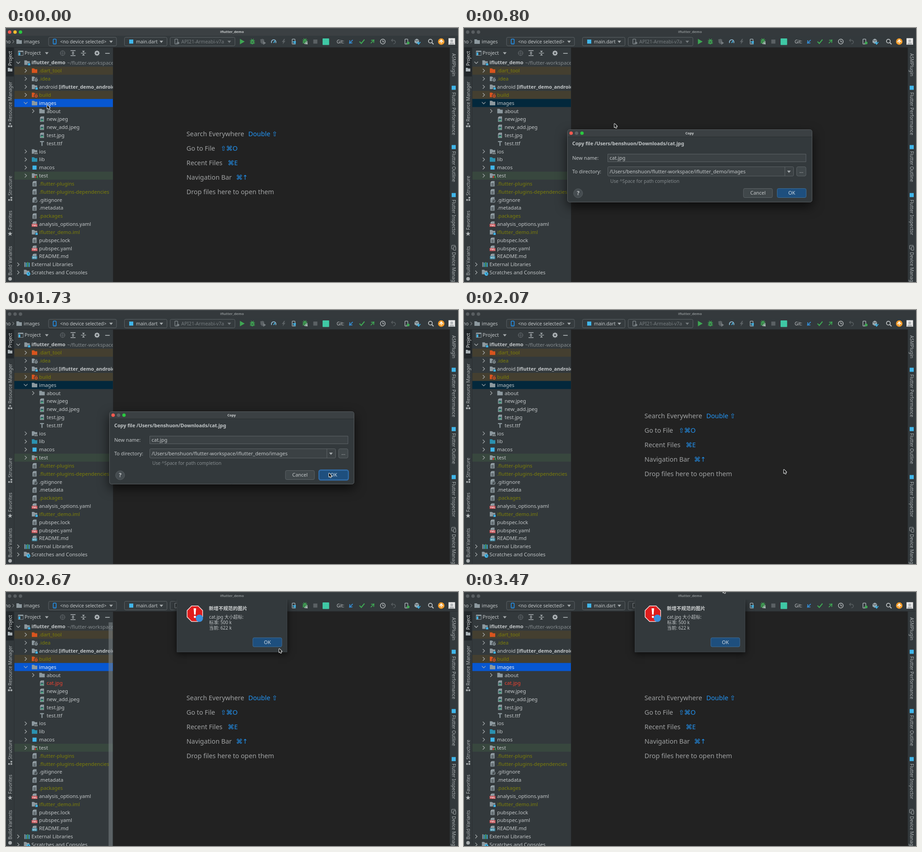
Write an HTML page with a canvas that moves like this. It is 998 px wide and 561 px high and loops after 3.54 s.

```html
<!DOCTYPE html>
<html lang="en">
<head>
<meta charset="utf-8">
<title>iflutter_demo</title>
<style>
html, body { margin: 0; width: 100%; height: 100%; overflow: hidden; background: #222; }
canvas { display: block; }
</style>
</head>
<body>
<canvas id="stage" width="998" height="561"></canvas>
<script>
const ctx = document.getElementById("stage").getContext("2d");
const LOOP = 3540, STEP = 1000 / 15;
const FONT = '"Noto Sans", "Open Sans", "DejaVu Sans", "Noto Sans CJK SC", "Noto Sans CJK", sans-serif';
const C = {
  panel: "#33393c", editor: "#222222", edge: "#26292b", text: "#c3c7c9", soft: "#a6abad",
  olive: "#7d7f08", grey: "#8d999f", dim: "#5b6164", blue: "#2295f5", sky: "#40b6ea",
  green: "#3fa653", orange: "#d9541e", red: "#ef4130", field: "#3b4144", border: "#5d6366"
};

// Drawing helpers
function text(s, x, cy, size = 11.2, color = C.text, weight = 400, align = "left") {
  ctx.font = `${weight} ${size}px ${FONT}`;
  ctx.fillStyle = color;
  ctx.textAlign = align;
  ctx.fillText(s, x, cy + size * 0.36);
}
function box(x, y, w, h, color) {
  ctx.fillStyle = color;
  ctx.fillRect(x, y, w, h);
}
function panel(x, y, w, h, r, fill, stroke, width = 1) {
  ctx.beginPath();
  ctx.roundRect(x, y, w, h, r);
  if (fill) { ctx.fillStyle = fill; ctx.fill(); }
  if (stroke) { ctx.strokeStyle = stroke; ctx.lineWidth = width; ctx.stroke(); }
}
function disc(x, y, r, color) {
  ctx.beginPath();
  ctx.arc(x, y, r, 0, 7);
  ctx.fillStyle = color;
  ctx.fill();
}
function ring(x, y, r, color, width = 1.3, from = 0, to = Math.PI * 2) {
  ctx.beginPath();
  ctx.arc(x, y, r, from, to);
  ctx.strokeStyle = color;
  ctx.lineWidth = width;
  ctx.stroke();
}
function trace(x, y, pts) {
  ctx.beginPath();
  for (let i = 0; i < pts.length; i += 2) ctx.lineTo(x + pts[i], y + pts[i + 1]);
}
function line(x, y, pts, color, width = 1.4) {
  trace(x, y, pts);
  ctx.strokeStyle = color;
  ctx.lineWidth = width;
  ctx.stroke();
}
function poly(x, y, pts, color) {
  trace(x, y, pts);
  ctx.closePath();
  ctx.fillStyle = color;
  ctx.fill();
}
function shadowed(blur, dy, draw) {
  ctx.save();
  ctx.shadowColor = "rgba(0,0,0,.65)";
  ctx.shadowBlur = blur;
  ctx.shadowOffsetY = dy;
  draw();
  ctx.restore();
}
const caret = (x, y, color = C.soft) => poly(x, y, [-4, -2, 4, -2, 0, 3], color);

// Icons, all centred on x, y
function folder(x, y, color = C.grey) {
  poly(x, y, [-6, -5, -1, -5, 1, -3, 6, -3, 6, 5, -6, 5], color);
}
function sheetIcon(x, y) {
  poly(x, y, [-1, -6, 4.5, -6, 4.5, 6, -4.5, 6, -4.5, -2.5], C.grey);
  poly(x, y, [-4.5, -3.2, -1.7, -6, -1.7, -3.2], "#b3bcc0");
}
function gear(x, y, r, color) {
  for (let i = 0; i < 4; i++) {
    const dx = Math.cos(i * Math.PI / 4) * r, dy = Math.sin(i * Math.PI / 4) * r;
    line(x, y, [-dx, -dy, dx, dy], color, r * 0.42);
  }
  disc(x, y, r * 0.74, color);
  disc(x, y, r * 0.34, C.panel);
}
function phone(x, y, color) {
  panel(x - 3.2, y - 5.5, 6.4, 11, 1.2, null, color, 1.5);
  box(x - 1, y + 3, 2, 1, color);
}
function bug(x, y, color) {
  for (const dy of [-2.5, 1, 4]) line(x, y, [-5.5, dy, 5.5, dy], color, 1.2);
  line(x, y, [-3, -6, 0, -3, 3, -6], color, 1.2);
  ctx.beginPath();
  ctx.ellipse(x, y + 1, 3.8, 5, 0, 0, 7);
  ctx.fillStyle = color;
  ctx.fill();
  line(x, y, [-2, 0, 2, 0], C.panel, 1);
  line(x, y, [-2, 2.5, 2, 2.5], C.panel, 1);
}
function arrow(x, y, angle, color, len = 5) {
  ctx.save();
  ctx.translate(x, y);
  ctx.rotate(angle);
  line(0, 0, [-len, 0, len, 0], color, 1.7);
  line(0, 0, [len - 5, -4, len, 0, len - 5, 4], color, 1.7);
  ctx.restore();
}

const icons = {
  folder,
  root(x, y) { folder(x, y); box(x + 1, y + 1, 6, 5, C.panel); box(x + 2, y + 1.5, 5, 4.5, C.sky); },
  hot(x, y) { folder(x, y, C.orange); },
  gear(x, y) { folder(x, y); disc(x + 3, y + 2, 4.5, C.panel); gear(x + 3.5, y + 2.5, 3.8, C.grey); },
  hotGear(x, y) { folder(x, y, C.orange); disc(x + 3, y + 2, 4.5, C.panel); gear(x + 3.5, y + 2.5, 3.8, C.orange); },
  ios(x, y) { folder(x, y); box(x - 1, y + 2, 8, 4, C.panel); for (const d of [0, 2.5, 5]) box(x + d, y + 3, 1.6, 3, "#a8b1b5"); },
  lib(x, y) { folder(x, y, "#2b91b0"); },
  square(x, y) { box(x - 4.5, y - 4.5, 9, 9, C.sky); },
  test(x, y) { folder(x, y); box(x, y, 7, 6, "#35423a"); poly(x, y, [1, 0, 4, 3, 1, 6], C.red); poly(x, y, [7, 0, 4, 3, 7, 6], C.green); },
  file(x, y) { sheetIcon(x, y); for (const d of [-1, 1.2, 3.4]) box(x - 2.5, y + d, 5, 1, C.panel); },
  image(x, y) { sheetIcon(x, y); box(x - 3, y - 1, 6, 5.5, "#2f5961"); poly(x, y, [-3, 4, -.5, 1, 1, 2.5, 2, 1, 3, 4], "#5fc08b"); },
  ttf(x, y) { box(x - 4.5, y - 5, 9, 2.2, C.grey); box(x - 1.2, y - 5, 2.4, 10.5, C.grey); },
  ignore(x, y) { sheetIcon(x, y); disc(x + 2.5, y + 2.5, 4.3, C.panel); ring(x + 2.5, y + 2.5, 3.2, C.grey, 1.2); line(x + 2.5, y + 2.5, [-2.2, -2.2, 2.2, 2.2], C.grey, 1); },
  yaml(x, y) { sheetIcon(x, y); box(x - 6.5, y - .5, 13, 6.5, "#c64b50"); text("YML", x, y + 2.7, 5.5, "#f3dfdf", 700, "center"); },
  md(x, y) { sheetIcon(x, y); box(x - 6, y - .5, 12, 6.5, "#327f9b"); text("MD", x, y + 2.7, 5.5, "#d5edf5", 700, "center"); },
  books(x, y) { ["#8d999f", "#40a5cf", "#48a96a", "#40a5cf"].forEach((c, i) => box(x - 6 + i * 3.2, y - 5 + i % 2, 2.2, 10.5 - i % 2, c)); },
  scratch(x, y) { folder(x - 1, y - 1); disc(x + 3, y + 3, 4.2, C.sky); line(x + 3, y + 3, [0, -2.5, 0, 0, 2, 1], "#20323a", 1); }
};

// label, icon, depth, open state (0 none, 1 closed, 2 open), text colour, row colour
const TREE = [
  ["iflutter_demo", "root", 0, 2],
  [".dart_tool", "hot", 1, 1, C.olive, "#443f30"],
  [".idea", "gear", 1, 1, C.olive],
  ["android", "root", 1, 1],
  ["build", "hotGear", 1, 1, C.olive, "#443f30"],
  ["images", "folder", 1, 2],
  ["about", "folder", 2, 1],
  ["cat.jpg", "image", 2, 0, C.red],
  ["new.jpeg", "image", 2, 0],
  ["new_add.jpeg", "image", 2, 0],
  ["test.jpg", "image", 2, 0],
  ["test.ttf", "ttf", 2, 0],
  ["ios", "ios", 1, 1],
  ["lib", "lib", 1, 1],
  ["macos", "square", 1, 1],
  ["test", "test", 1, 1, C.text, "#38473e"],
  [".flutter-plugins", "file", 1, 0, C.olive],
  [".flutter-plugins-dependencies", "file", 1, 0, C.olive],
  [".gitignore", "ignore", 1, 0],
  [".metadata", "file", 1, 0],
  [".packages", "file", 1, 0, C.olive],
  ["analysis_options.yaml", "yaml", 1, 0],
  ["iflutter_demo.iml", "root", 1, 0, C.olive],
  ["pubspec.lock", "file", 1, 0],
  ["pubspec.yaml", "yaml", 1, 0],
  ["README.md", "md", 1, 0],
  ["External Libraries", "books", 0, 1],
  ["Scratches and Consoles", "scratch", 0, 1]
];

function drawTree(hasCat, focused) {
  ctx.save();
  ctx.beginPath();
  ctx.rect(18, 44, 218, 517);
  ctx.clip();
  const rows = TREE.filter(r => hasCat || r[0] !== "cat.jpg");
  rows.forEach(([label, icon, depth, open, color = C.text, fill], i) => {
    const y = 76.5 + i * 17.83, x = 27 + depth * 16.5;
    const selected = label === "images";
    if (selected) fill = focused ? "#0757d2" : "#03283c";
    if (fill) box(18, y - 8.9, 218, 17.8, fill);
    if (open === 1) line(x, y, [-2, -4, 2, 0, -2, 4], C.soft, 1.3);
    if (open === 2) line(x, y, [-4, -2, 0, 2, 4, -2], C.soft, 1.3);
    icons[icon](x + 19.5, y);
    const tx = 56.3 + depth * 16.7;
    const bold = label === "iflutter_demo";
    text(label, tx, y, bold ? 11 : 11.2, selected && focused ? "#f0f3f6" : color, bold ? 700 : 400);
    if (bold) text("~/flutter-workspace", 135, y, 11.2, "#858b8e");
    if (label === "android") text("[iflutter_demo_android]", 116.5, y, 10.9, C.text, 700);
  });
  ctx.restore();
}

function drawProjectHeader() {
  panel(27, 50.5, 11, 10, 0, null, C.grey);
  box(27, 50, 11, 3, C.grey);
  box(28, 54, 3.5, 6, C.sky);
  text("Project", 41, 55.5, 11);
  caret(90, 55.5);
  ring(125, 55.5, 5, C.dim);
  line(125, 55.5, [-6, 0, 6, 0], C.dim, 1);
  line(125, 55.5, [0, -6, 0, 6], C.dim, 1);
  for (const [x, s] of [[148, 1], [171, -1]]) {
    if (s > 0) for (const d of [-5.5, 5.5]) line(x, 55.5 + d, [-5.5, 0, 5.5, 0], "#b3b9bc", 1.5);
    else line(x, 55.5, [-5.5, 0, 5.5, 0], "#b3b9bc", 1.3);
    const a = s > 0 ? 3.6 : 1.6, b = s > 0 ? 0.8 : 5;
    for (const d of [-1, 1]) poly(x, 55.5, [0, d * a, -3, d * b, 3, d * b], "#b3b9bc");
  }
  gear(201, 55.5, 5.8, "#b3b9bc");
  line(224, 56, [-5, 0, 5, 0], "#b3b9bc", 1.6);
}

function lights(x, y, colors) {
  colors.forEach((c, i) => disc(x + i * 12, y, 3.8, c));
}

function drawToolbar(active) {
  box(0, 0, 998, 43, C.panel);
  box(0, 0, 998, 17, active ? "#3b4043" : "#34393c");
  box(0, 0, 998, 1, active ? "#565b5e" : "#45494c");
  box(0, 42.5, 998, 1, C.edge);
  const off = "#595e61";
  lights(8, 9, active ? ["#ff5a50", "#f8bd2e", "#2bc840"] : [off, off, off]);
  text("iflutter_demo", 499, 8.7, 7.7, active ? "#c9cccd" : "#8a8f91", 600, "center");

  text("no", -2.5, 30, 10.4);
  line(16, 30, [-1.5, -3.5, 1.5, 0, -1.5, 3.5], C.soft, 1);
  folder(29, 30);
  text("images", 39, 30, 10.4);
  for (const [x, w] of [[94, 150], [261.5, 94], [362.5, 143]]) panel(x, 20.5, w, 19, 3, "#353b3e", C.border);
  phone(107.5, 30, C.blue);
  text("<no device selected>", 119.5, 30, 10.5);
  caret(232, 30);
  box(272, 25.5, 9, 9, C.sky);
  text("main.dart", 287, 30, 10.4);
  caret(343, 30);
  phone(376, 30, "#798084");
  disc(380, 33, 2.6, "#798084");
  text("API21-Armeabi-v7a", 387, 30, 10.5, "#757b7e");
  caret(493, 30, "#757b7e");

  poly(521, 30, [-4.5, -6, 6, 0, -4.5, 6], C.green);
  bug(544, 30, C.green);
  poly(567, 30, [-5.5, -5, 0, -6, 3, -4, 3, 2, -1, 6, -5, 2], C.dim);
  poly(569, 32, [-1, -3, 5, 1, -1, 5], "#777d80");
  ring(591, 31, 5, "#87aec4", 2, 2.7, 6.75);
  line(591, 31, [0, 2, 3, -3], C.sky, 2);
  poly(613, 30, [1, -6, -4, 1, -1, 1, -2, 6, 4, -1.5, 1, -1.5, 3, -6], C.dim);
  phone(635, 30, "#9aa6ab");
  arrow(637, 32, -0.8, C.sky, 3);
  bug(660, 29, C.green);
  arrow(663, 33, 0.8, "#aab2b5", 3);
  box(678.5, 25.5, 9, 9, C.dim);
  panel(699, 23, 14.5, 14.5, 1, "#3fc8a5");
  text("Git:", 730, 30, 10.4);
  arrow(762, 30, Math.PI * 0.75, "#3591dd");
  line(786, 30, [-5.5, 0, -1.5, 4, 5.5, -4.5], C.green, 2.2);
  arrow(809, 30, -Math.PI / 4, C.green);
  ring(832, 30, 5.4, "#b5babc", 1.5);
  line(832, 30, [0, -3.5, 0, 0.5, 3, 0.5], "#b5babc", 1.3);
  ring(856, 31, 3.8, C.dim, 1.5, -1.6, 1.7);
  line(856, 27.2, [0, 0, -5, 0], C.dim);
  line(856, 27.2, [-2, -3, -5, 0, -2, 3], C.dim);
  phone(884, 30, "#a4adb1");
  disc(888, 33, 3.1, C.green);
  poly(907, 29, [-5, -3, 0, -5.5, 5, -3, 5, 3, 0, 6, -5, 3], "#9aa5aa");
  line(907, 29, [-5, -3, 0, 0, 5, -3], C.panel, 1);
  arrow(911, 33, Math.PI / 2, C.sky, 3);
  ring(937, 29, 4.2, "#c0c4c6", 1.7);
  line(940, 32, [0, 0, 4, 4], "#c0c4c6", 2);
  disc(961, 30, 7.2, "#f09a28");
  arrow(961, 30, -Math.PI / 2, "#fff", 3.8);
  box(977, 22.5, 14.5, 14.5, "#e8e8e8");
  disc(984.2, 28.5, 3, "#b3b6b8");
  poly(984.2, 37, [-6, 0, -4, -4.5, 4, -4.5, 6, 0], "#b3b6b8");
}

function sideLabel(s, x, y, turn, color = "#b0b5b7") {
  ctx.save();
  ctx.translate(x, y);
  ctx.rotate(turn * Math.PI / 2);
  text(s, 0, 0, 10, color);
  ctx.restore();
}

function drawStripes() {
  box(0, 43, 18, 518, C.panel);
  box(0, 43, 17.5, 64, "#22272a");
  box(17.5, 43, 1, 518, "#2a2f31");
  sideLabel("Project", 9, 83.5, -1, "#e0e3e4");
  for (const [s, y] of [["Resource Manager", 206.5], ["Structure", 370], ["Favorites", 446], ["Build Variants", 546.5]])
    sideLabel(s, 9, y, -1);
  poly(9, 92, [-5, -4, -1, -4, 0, -2.5, 5, -2.5, 5, 4, -5, 4], "#a8b1b5");
  poly(9, 213, [-3, 0, 0, -4, 3, 0], C.soft);
  box(4.5, 215, 4, 4, C.soft);
  disc(11.8, 217, 2.2, C.soft);
  for (const [x, y] of [[5, 378], [10, 378], [10, 373]]) box(x, y, 3.6, 3.6, C.soft);
  const star = [];
  for (let i = 0; i < 10; i++) {
    const r = i % 2 ? 2.3 : 5.6, a = i * Math.PI / 5 - Math.PI / 2;
    star.push(r * Math.cos(a), r * Math.sin(a));
  }
  poly(9, 454.5, star, "#b4b9bb");
  disc(9, 554, 4, C.soft);

  box(980, 43, 18, 518, C.panel);
  box(979.5, 43, 1, 518, "#2a2f31");
  for (const [s, y] of [["ASMPlugin", 56], ["Flutter Performance", 142], ["Flutter Outline", 272], ["Flutter Inspector", 379], ["Device Manager", 495]])
    sideLabel(s, 988.5, y, 1);
  for (const y of [132, 263, 369]) box(984, y - 4.5, 9, 9, C.sky);
  panel(984, 480, 8, 8, 1, null, C.soft);
  panel(988, 483, 5, 8, 1, C.panel, C.soft);
}

function drawHints() {
  const hints = [["Search Everywhere", "Double ⇧", 535], ["Go to File", "⇧⌘O", 474], ["Recent Files", "⌘E", 489.5],
    ["Navigation Bar", "⌘↑", 508], ["Drop files here to open them", "", 0]];
  hints.forEach(([label, keys, x], i) => {
    const y = 233.7 + i * 32.1;
    text(label, 398.5, y, 14.3, "#a0a2a3");
    text(keys, x, y, 14.3, C.blue);
  });
}

function button(label, x, y, w, primary) {
  panel(x + .5, y + .5, w - 1, 20, 3, primary ? "#1e4f7e" : "#40474a", primary ? "#3e6d96" : C.border);
  text(label, x + w / 2, y + 10.5, 10.9, primary ? "#d2dce5" : C.text, 400, "center");
}

function drawCopyDialog(pressed) {
  shadowed(24, 9, () => panel(228, 224, 541, 161, 5, C.panel));
  panel(228.5, 224.5, 540, 160, 5, null, "#585d60");
  panel(229, 225, 539, 15.5, [5, 5, 0, 0], "#3b4043");
  box(229, 240, 539, 1, "#292d2f");
  lights(236.5, 232.3, ["#ff5a50", "#5d6265", "#2bc840"]);
  text("Copy", 498, 232, 7.7, "#cfd2d3", 600, "center");
  text("Copy file /Users/benshuon/Downloads/cat.jpg", 239, 254.8, 10.8, C.text, 700);
  text("New name:", 239, 287, 11);
  text("To directory:", 239, 317, 11);
  panel(317.5, 278.5, 437.5, 17, 0, C.field, C.border);
  text("cat.jpg", 321.5, 287, 11);
  panel(317.5, 306.5, 410, 20.5, 2, C.field, C.border);
  box(708, 307, 1, 20, C.border);
  caret(717.5, 317);
  text("/Users/benshuon/flutter-workspace/iflutter_demo/images", 321.5, 317, 11);
  panel(734.5, 306.5, 20.5, 20.5, 3, "#40474a", C.border);
  text("...", 744.8, 316.5, 11, C.text, 400, "center");
  text("Use ^Space for path completion", 323, 338, 10.2, "#858b8e");
  disc(252, 365, 10, "#454c50");
  ring(252, 365, 10, "#555c5f", 1);
  text("?", 252, 365, 12, C.text, 700, "center");
  button("Cancel", 616.5, 354, 65, false);
  button("OK", 691, 354, 65, true);
  if (pressed) panel(691, 353.5, 65, 22, 4, null, "#2f6aa6", 2.4);
}

function drawAlert(slide) {
  ctx.save();
  ctx.beginPath();
  ctx.rect(340, 17, 320, 180);
  ctx.clip();
  ctx.translate(0, -116 * (1 - slide));
  shadowed(14, 4, () => box(377, 17, 244, 116, C.panel));
  panel(377.5, 16.5, 243, 116, 0, null, "#3d4346");
  const oct = [];
  for (let i = 0; i < 8; i++) {
    const a = (i + 0.5) * Math.PI / 4;
    oct.push(18.6 * Math.cos(a), 18.6 * Math.sin(a));
  }
  poly(417, 48, oct, "#df1d1d");
  line(417, 48, [...oct, oct[0], oct[1]], "#f4dcdc", 1.5);
  poly(417, 46, [-2.7, -10, 2.7, -10, 1.5, 4, -1.5, 4], "#fff");
  disc(417, 55, 2.4, "#fff");
  disc(427, 58, 8, "#3b8fdc");
  text("新增不规范的图片", 448, 35.7, 10.6, "#d0d3d4", 700);
  text("cat.jpg 大小超标:", 448.5, 55, 9.9);
  text("标准: 500 k", 448.5, 67.3, 9.9);
  text("当前: 622 k", 448.5, 79.5, 9.9);
  button("OK", 544.5, 100.5, 65, true);
  ctx.restore();
}

// Pointer keys: step, x, y
const PATH = [[0, 91, 170], [8, 93, 170], [9, 98, 171], [12, 332, 211], [14, 350, 222], [23, 713, 360],
  [27, 713, 360], [31, 706, 352], [33, 703, 346], [39, 603, 125], [44, 603, 125], [51, 572, -7], [54, 572, -7]];

function pointerAt(k) {
  const i = PATH.findIndex((p, n) => k < PATH[n + 1][0]);
  const [k0, x0, y0] = PATH[i], [k1, x1, y1] = PATH[i + 1];
  const u = (k - k0) / (k1 - k0), e = u * u * (3 - 2 * u);
  return [x0 + (x1 - x0) * e, y0 + (y1 - y0) * e];
}

function drawPointer(x, y) {
  const shape = [0, 0, 0, 8.6, 2, 6.8, 3.5, 10, 5, 9.3, 3.6, 6.3, 6.2, 6.2];
  ctx.lineJoin = "round";
  line(x, y, [...shape, 0, 0], "#eef0f1", 1.9);
  poly(x, y, shape, "#111");
  ctx.lineJoin = "miter";
}

function draw(ms) {
  const k = Math.floor((ms % LOOP + 4) / STEP);
  const active = k < 10;
  box(0, 0, 998, 561, C.editor);
  box(18, 43, 218, 518, C.panel);
  box(236, 43, 1, 518, C.edge);
  drawHints();
  drawTree(k >= 35, active || k >= 36);
  drawProjectHeader();
  if (k >= 36 && k < 46) {
    ctx.globalAlpha = Math.min(1, (46 - k) / 3);
    box(226.5, 67, 9, 494, "rgba(125,132,136,.55)");
    ctx.globalAlpha = 1;
  }
  drawToolbar(active);
  drawStripes();
  if (k >= 11 && k < 28) drawCopyDialog(k >= 25);
  if (k >= 36) drawAlert(Math.min(1, (k - 35) / 3));
  drawPointer(...pointerAt(k));
}

function tick() {
  draw(performance.now());
  requestAnimationFrame(tick);
}
tick();
</script>
</body>
</html>
```
